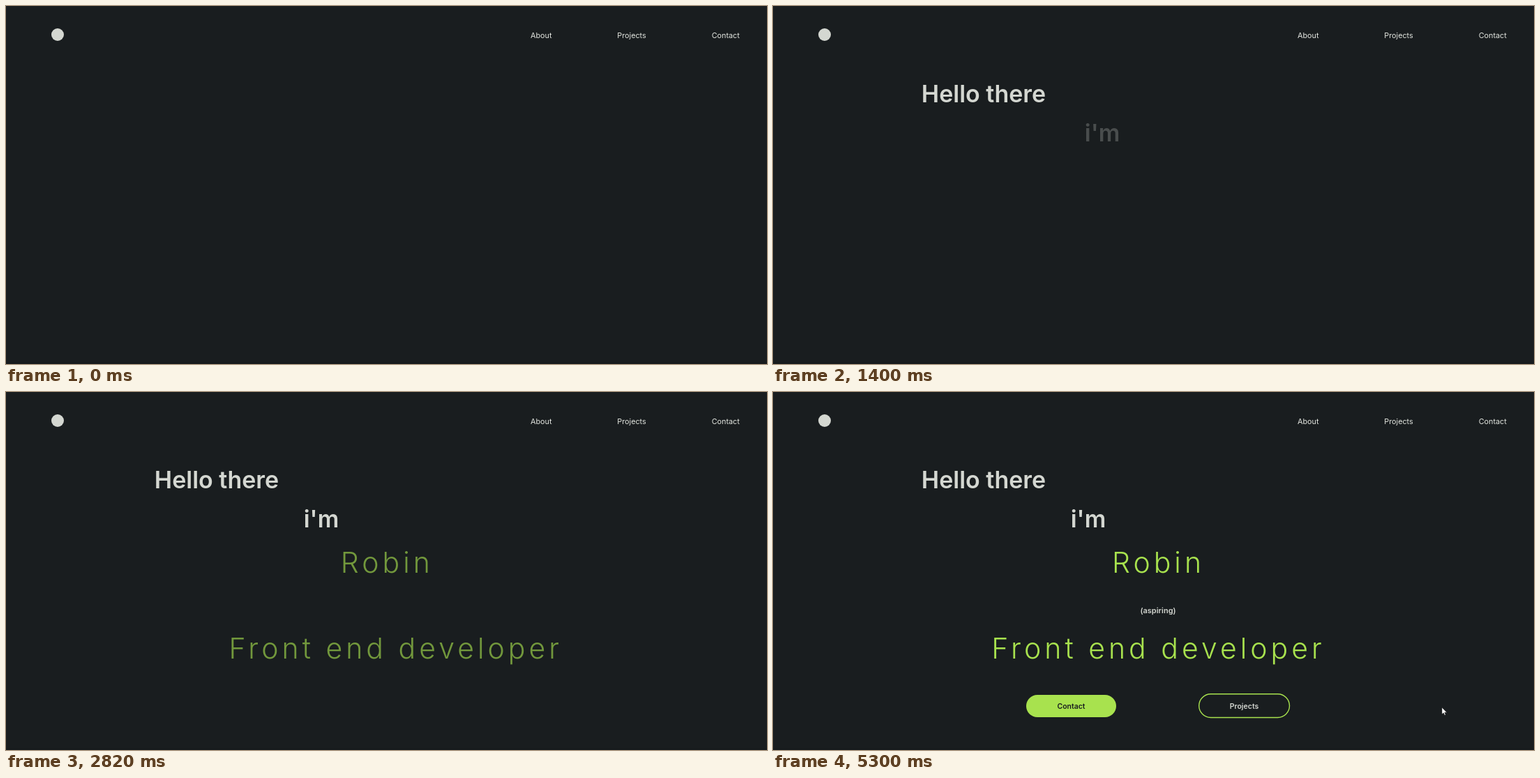
Animation of 1091 by 513 pixels, one loop 5360 ms. Source, as an HTML page:

```html
<!DOCTYPE html>
<html lang="en">
<head>
<meta charset="utf-8">
<title>Portfolio intro</title>
<style>
  html, body { margin: 0; height: 100%; overflow: hidden; background: #191d1f; }
  svg { display: block; width: 100vw; height: 100vh; font-family: Inter, "Open Sans", sans-serif; }
  text { text-anchor: middle; fill: #d4d7d1; }
  .nav { font-size: 10.8px; fill: #e4e7e1; }
  .hi { font-size: 34px; font-weight: 600; }
  .big { font-size: 41px; font-weight: 300; letter-spacing: 5px; fill: #a8e24e; }
  .small { font-size: 10.5px; font-weight: 600; }
</style>
</head>
<body>
<svg viewBox="0 0 1091 513">
  <rect y="510" width="1091" height="3" fill="#171b1d"/>
  <circle cx="74" cy="41" r="9" fill="#d4d7d1"/>
  <text class="nav" x="767.3" y="46">About</text>
  <text class="nav" x="897" y="46">Projects</text>
  <text class="nav" x="1031.7" y="46">Contact</text>
  <text id="hello" class="hi" x="302" y="138">Hello there</text>
  <text id="im" class="hi" x="452" y="194">i'm</text>
  <text id="name" class="big" x="552.5" y="258.5">Robin</text>
  <text id="job" class="big" x="552.5" y="381.5">Front end developer</text>
  <g id="extras">
    <text class="small" style="font-size:11px" x="552" y="317">(aspiring)</text>
    <rect x="363" y="434" width="129" height="32" rx="16" fill="#a8e24e"/>
    <text class="small" x="427.5" y="454" style="fill:#191d1f">Contact</text>
    <rect x="610.7" y="432.7" width="129.8" height="33.8" rx="16.9" fill="none" stroke="#a8e24e" stroke-width="1.4"/>
    <text class="small" x="675.5" y="454">Projects</text>
  </g>
  <path id="cursor" d="M0 0V9.8L2.3 7.8L3.8 11.2L5.3 10.5L3.9 7.2H7Z" fill="#fff" stroke="#111" stroke-width=".5"/>
</svg>
<script>
const LOOP = 5360, STEP = 67, SHIFT = 35;
const $ = id => document.getElementById(id);
const clamp = p => Math.min(1, Math.max(0, p));
const easeOut = p => 1 - (1 - p) ** 2.4;
const smooth = p => p * p * (3 - 2 * p);

// Linear interpolation through [time, value] keys
function track(t, keys) {
  if (t <= keys[0][0]) return keys[0][1];
  for (let i = 1; i < keys.length; i++) {
    const [t0, a] = keys[i - 1], [t1, b] = keys[i];
    if (t <= t1) return a + (b - a) * (t - t0) / (t1 - t0);
  }
  return keys[keys.length - 1][1];
}

function slide(id, dx, opacity) {
  $(id).setAttribute("transform", `translate(${dx} 0)`);
  $(id).setAttribute("opacity", opacity);
}

const cursorX = [[3953, 184], [4087, 483], [4288, 462], [4740, 668], [4820, 670], [5025, 671], [5290, 959]];
const cursorY = [[3953, 20], [4087, 226], [4288, 217], [4740, 340], [4820, 341.5], [5025, 342], [5290, 452]];

function draw(t) {
  const away = (start, length, ease) => SHIFT * (1 - ease(clamp((t - start) / length)));
  slide("hello", -away(0, 1000, easeOut), track(t, [[0, 0], [800, .72], [1000, 1]]));
  slide("im", away(1200, 1000, easeOut), track(t, [[1150, 0], [1870, .72], [2070, 1]]));

  const green = track(t, [[1800, 0], [2550, .49], [3090, .76], [3350, 1]]);
  const gap = away(1900, 1250, smooth);
  slide("name", -gap, green);
  slide("job", gap, green);
  slide("extras", 0, track(t, [[2820, 0], [3085, .57], [3550, 1]]));

  const cursor = $("cursor");
  cursor.setAttribute("visibility", t >= 3950 ? "visible" : "hidden");
  cursor.setAttribute("transform", `translate(${track(t, cursorX)} ${track(t, cursorY)})`);
}

const start = performance.now();
function tick() {
  const t = (performance.now() - start) % LOOP;
  draw(Math.floor(t / STEP + .1) * STEP);
  requestAnimationFrame(tick);
}
tick();
</script>
</body>
</html>
```
